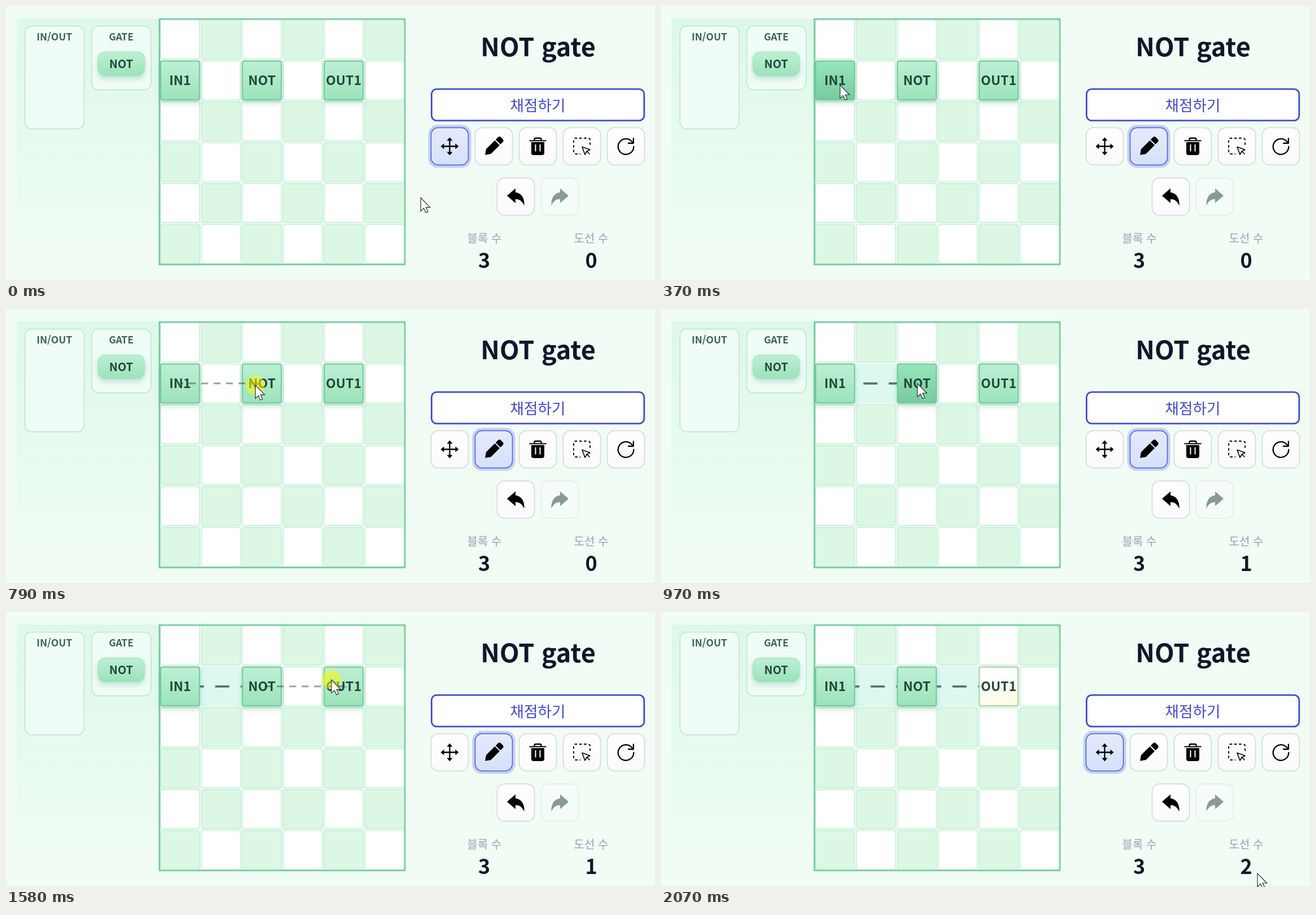
An HTML page that plays this animation: 1149 by 487 pixels, repeating every 2100 ms.

```html
<!DOCTYPE html>
<html lang="ko">
<head>
<meta charset="utf-8">
<title>NOT gate</title>
<style>
  html, body { margin: 0; width: 100%; height: 100%; overflow: hidden; background: #f0fcf4; }
  svg { display: block; width: 1149px; height: 487px; }
  text {
    font-family: "Noto Sans CJK KR", "Noto Sans KR", "Noto Sans CJK JP", "Noto Sans CJK", sans-serif;
    font-weight: 700; text-anchor: middle;
  }
  .label { fill: #94a3b3; font-weight: 400; font-size: 20px; }
  .count { fill: #0f172a; font-size: 36px; }
  .head { fill: #3c625c; font-size: 17.4px; }
  .name { fill: #22473c; font-size: 23px; }
  .group { fill: #f0fcf6; stroke: #b4e5d3; stroke-width: 1.4; }
  .wire { fill: none; stroke: #4c7b6e; stroke-width: 3.8; stroke-dasharray: 25 20; }
  .button { fill: url(#plain); stroke: #d3d5d9; stroke-width: 1.5; }
  .halo { fill: #c5d0f3; display: none; }
  .active .halo { display: inline; }
  .active .button { fill: url(#chosen); stroke: #4a5ad8; }
  .line { fill: none; stroke: #000; stroke-width: 2.3; stroke-linecap: round; stroke-linejoin: round; }
</style>
</head>
<body>
<svg id="stage" viewBox="0 0 1149 487">
  <defs>
    <linearGradient id="panel" x2="0" y2="1"><stop stop-color="#ddf8e8"/><stop offset="1" stop-color="#f0fcf4"/></linearGradient>
    <linearGradient id="mint" x2="0" y2="1"><stop stop-color="#bdf0d3"/><stop offset="1" stop-color="#9be3ba"/></linearGradient>
    <linearGradient id="dark" x2="0" y2="1"><stop stop-color="#99e5bd"/><stop offset="1" stop-color="#76cb9c"/></linearGradient>
    <linearGradient id="lit" x2=".4" y2="1"><stop offset=".3" stop-color="#fff"/><stop offset="1" stop-color="#fcfde6"/></linearGradient>
    <linearGradient id="plain" x2="0" y2="1"><stop stop-color="#fff"/><stop offset="1" stop-color="#fafafc"/></linearGradient>
    <linearGradient id="chosen" x2="0" y2="1"><stop stop-color="#e5ebfd"/><stop offset="1" stop-color="#d6e0fb"/></linearGradient>
    <filter id="shadow" x="-40%" y="-40%" width="180%" height="200%">
      <feDropShadow dx="0" dy="5" stdDeviation="5" flood-color="#2c8c60" flood-opacity=".24"/>
    </filter>
  </defs>

  <rect width="1149" height="487" fill="#f0fcf4"/>
  <rect y="486" width="1149" height="1" fill="#dfe9e4"/>
  <rect x="19" y="22" width="252" height="416" fill="url(#panel)"/>

  <rect class="group" x="33.5" y="35.5" width="104.7" height="182" rx="12"/>
  <rect class="group" x="152" y="35.5" width="104.7" height="113" rx="12"/>
  <text class="head" x="85.7" y="61.3">IN/OUT</text>
  <text class="head" x="204" y="61.3">GATE</text>
  <rect x="162.8" y="81.3" width="82.4" height="42" rx="12" fill="url(#mint)" stroke="#9ddfbf" filter="url(#shadow)"/>
  <text class="name" x="204" y="110" style="font-size:20px">NOT</text>

  <rect x="271.7" y="23.3" width="434.4" height="434.4" fill="#effcf3" stroke="#75cb9e" stroke-width="2.8"/>
  <g id="cells"></g>
  <g id="wires"></g>
  <g id="nodes"></g>

  <text x="942" y="88.6" fill="#0f172a" font-size="45">NOT gate</text>
  <rect x="753.4" y="147.2" width="376.4" height="55.6" rx="9" fill="#fff" stroke="#414cc9" stroke-width="2.8"/>
  <text x="941.5" y="185.7" fill="#414cc9" font-size="26.6" style="font-weight:400">채점하기</text>

  <g id="buttons"></g>
  <g id="icons">
    <path class="line" d="M785.5 235V262M772 248.5H799" stroke-linecap="butt"/>
    <path d="M785.5 232.5l5 6h-10zM785.5 264.5l5-6h-10zM769.5 248.5l6-5v10zM801.5 248.5l-6-5v10z"/>
    <path transform="translate(863.7 248.3) rotate(-45)"
      d="M-22 0L-13.5-6H8.500V6H-13.500ZM10.500-6H16Q20-6 20-2V2Q20 6 16 6H10.500Z"/>
    <path d="M926.500 237.500H956.500V239.500H926.500ZM930 241H953V260Q953 264 949 264H934Q930 264 930 260Z"/>
    <path class="line" d="M935.500 237V236Q935.500 234 938 234H945Q947.500 234 947.500 236V237"/>
    <path d="M937.500 245V257.500M945.500 245V257.500" stroke="#fff" stroke-width="2"/>
    <path class="line" d="M1034 246V238Q1034 234 1030 234H1009Q1005 234 1005 238V258Q1005 262 1009 262H1017"
      style="stroke-width:1.8;stroke-dasharray:4.500 3.800;stroke-linecap:butt"/>
    <path class="line" d="M1020 249.500L1034 254.500 1028.500 257 1033 262M1028.500 257L1025 263 1020 249.500" style="stroke-width:1.6"/>
    <path class="line" d="M1111.300 249A13.800 13.800 0 1 1 1107.200 239.200L1110.500 242.500M1110.800 234.500V243H1102"/>
    <path id="reply" d="M887 336L902 323V330C912 331 918.500 340 917.500 353.500C913.500 344.500 908.500 342 902 342V349Z"/>
    <use href="#reply" transform="translate(1883 0) scale(-1 1)" fill="#869c90"/>
  </g>

  <text class="label" x="847" y="418.600">블록 수</text>
  <text class="label" x="1036" y="418.600">도선 수</text>
  <text class="count" x="846.500" y="463.600">3</text>
  <text class="count" id="wireCount" x="1036" y="463.600">0</text>

  <path id="drag" fill="none" stroke="#203a30" stroke-opacity=".46" stroke-width="3"
    stroke-dasharray="12 10" stroke-miterlimit="10"/>
  <circle id="press" r="16.800" fill="#fffa00" fill-opacity=".54"/>
  <path id="cursor" d="M0 0V23.500L5.300 18.500 9 26.500 12.700 24.800 9.200 17H16.600Z" fill="#fff" stroke="#222" stroke-width="1.100"/>
</svg>
<script>
const LOOP = 2100, PITCH = 72.4, LEFT = 273.2, TOP = 24.4, SIZE = 70;
const ROW_Y = TOP + PITCH + SIZE / 2;
const $ = id => document.getElementById(id);
const colX = col => LEFT + PITCH * col + SIZE / 2;
const within = (t, [from, to]) => t >= from && t < to;

function add(parent, tag, attrs, text) {
  const el = document.createElementNS("http://www.w3.org/2000/svg", tag);
  for (const key in attrs) el.setAttribute(key, attrs[key]);
  if (text) el.textContent = text;
  return parent.appendChild(el);
}

for (let i = 0; i < 36; i++) {
  const col = i % 6, row = (i - col) / 6;
  add($("cells"), "rect", {
    x: LEFT + PITCH * col + .5, y: TOP + PITCH * row + .5, width: SIZE - 1, height: SIZE - 1, rx: 3.5,
    fill: (row + col) % 2 ? "#dcf8e5" : "#fff", stroke: "#bcedcf", "stroke-width": 1.3
  });
}

const wires = [0, 2].map(col => {
  const g = add($("wires"), "g", {});
  add(g, "rect", { x: colX(col) + 36, y: TOP + PITCH, width: 73, height: SIZE, fill: "#ddf8f1" });
  return { g, path: add(g, "path", { class: "wire", d: `M${colX(col)} ${ROW_Y}H${colX(col + 2)}` }) };
});

const nodes = ["IN1", "NOT", "OUT1"].map((name, i) => {
  const x = colX(i * 2);
  const box = add($("nodes"), "rect", {
    x: x - 34.4, y: ROW_Y - 34.4, width: 68.8, height: 68.8, rx: 3, "stroke-width": 2, filter: "url(#shadow)"
  });
  add($("nodes"), "text", { class: "name", x, y: ROW_Y + 8.4 }, name);
  return box;
});

function addButton(x, y, opacity = 1) {
  const g = add($("buttons"), "g", { opacity });
  add(g, "rect", { class: "halo", x: x - 5, y: y - 5, width: 76, height: 76, rx: 17 });
  add(g, "rect", { class: "button", x, y, width: 66, height: 66, rx: 13 });
  return g;
}
const tools = [0, 1, 2, 3, 4].map(i => addButton(752.5 + 78 * i, 215.5));
addButton(869.5, 304.5);
addButton(947.5, 304.5, .45);

// Cursor path: time, x, y
const path = [
  [0, 735.5, 340], [30, 700, 328], [110, 480, 244], [190, 346, 193], [300, 322, 150], [400, 315, 136],
  [470, 326, 136], [530, 350, 141], [570, 360, 143], [700, 415, 139], [810, 447, 134],
  [970, 454, 132], [1090, 457, 131], [1120, 470, 129], [1160, 494, 126], [1200, 519, 123],
  [1380, 563, 121], [1580, 576, 120], [1640, 582, 124], [1850, 790, 273], [2070, 1056, 463], [2100, 1056, 463]
];
function cursorAt(t) {
  const i = Math.max(1, path.findIndex(p => p[0] > t));
  const [t0, x0, y0] = path[i - 1], [t1, x1, y1] = path[i];
  const k = (t - t0) / (t1 - t0);
  return [x0 + (x1 - x0) * k, y0 + (y1 - y0) * k];
}

const drags = [{ col: 0, time: [470, 820] }, { col: 2, time: [1100, 1605] }];
const PEN = [100, 1850], DRAG_LAG = 40;

function paintNode(box, style) {
  box.setAttribute("fill", `url(#${style})`);
  box.setAttribute("stroke", style === "lit" ? "#a8cfa2" : "#74c69c");
  box.setAttribute("filter", style === "lit" ? "none" : "url(#shadow)");
}

function draw(t) {
  const [x, y] = cursorAt(t);
  $("cursor").setAttribute("transform", `translate(${x} ${y})`);

  const drawing = within(t, PEN);
  tools[0].classList.toggle("active", !drawing);
  tools[1].classList.toggle("active", drawing);

  const done = drags.filter(d => t >= d.time[1]).length;
  $("wireCount").textContent = done;
  wires.forEach(({ g, path }, i) => {
    g.style.display = i < done ? "" : "none";
    path.style.strokeDashoffset = -(50 + .0936 * (t - 970));
  });

  paintNode(nodes[0], within(t, [330, 470]) ? "dark" : "mint");
  paintNode(nodes[1], within(t, [820, 1110]) ? "dark" : "mint");
  paintNode(nodes[2], done === 2 ? "lit" : "mint");

  const drag = drags.find(d => within(t, d.time));
  $("drag").style.display = $("press").style.display = drag ? "" : "none";
  if (!drag) return;
  $("press").setAttribute("cx", x);
  $("press").setAttribute("cy", y);
  // The line runs through the centre of each cell passed, then to the pointer.
  const [tipX, tipY] = cursorAt(Math.max(t - DRAG_LAG, drag.time[0]));
  const last = Math.floor((tipX - LEFT + 1.2) / PITCH);
  let d = `M${colX(drag.col)} ${ROW_Y}`;
  for (let col = drag.col + 1; col <= last; col++) d += `L${colX(col)} ${ROW_Y}`;
  $("drag").setAttribute("d", `${d}L${tipX} ${tipY}`);
  $("drag").style.strokeDashoffset = -.0698 * (t - 570);
}

const start = performance.now();
function tick() {
  draw((performance.now() - start) % LOOP);
  requestAnimationFrame(tick);
}
tick();
</script>
</body>
</html>
```
